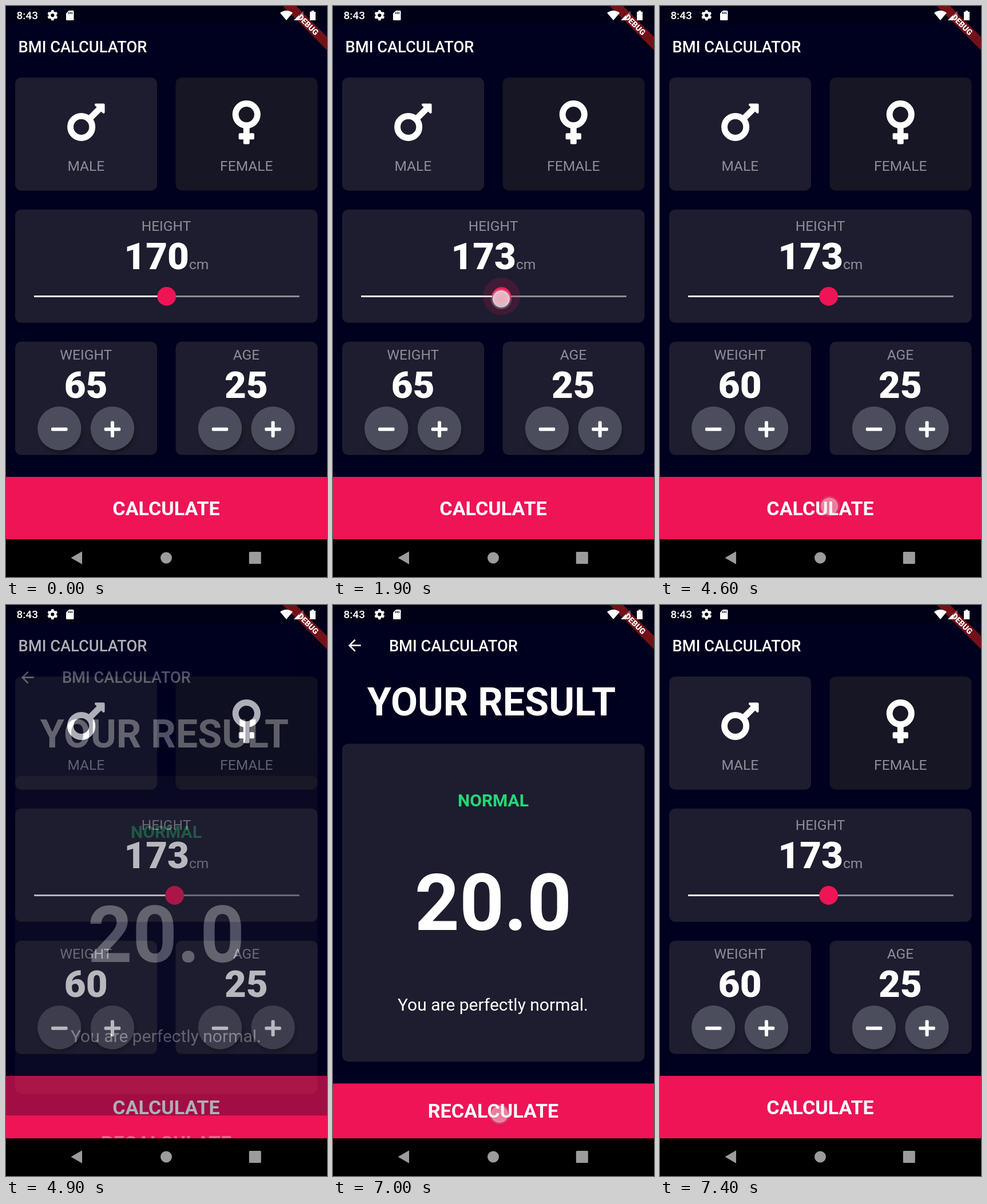
Recreate the animation shown at these times as an HTML page. Size 561x998 px, loop 9200 ms.

```html
<!DOCTYPE html>
<html lang="en">
<head>
<meta charset="utf-8">
<title>BMI calculator</title>
<style>
  html, body { margin: 0; width: 100%; height: 100%; overflow: hidden; background: #000; }
  svg { display: block; width: 100vw; height: 100vh; font-family: Roboto, "Noto Sans", sans-serif; fill: #fff; }
  .mid { text-anchor: middle; }
  .label { font-size: 24.55px; fill: #8d8e98; }
  .number { font-size: 65.45px; font-weight: 900; }
  .title { font-size: 27.3px; font-weight: 500; }
  .action { font-size: 34.1px; font-weight: 700; }
  .card { fill: #1d1d2f; }
  .pink { fill: #ee1456; }
  .page { fill: #00001f; }
</style>
</head>
<body>
<svg viewBox="0 0 561 998" preserveAspectRatio="none">
  <defs>
    <filter id="blur" x="-50%" y="-50%" width="200%" height="200%"><feGaussianBlur stdDeviation="3"/></filter>
    <radialGradient id="spot">
      <stop offset="0" stop-color="#fff" stop-opacity=".66"/>
      <stop offset=".62" stop-color="#fff" stop-opacity=".7"/>
      <stop offset=".72" stop-color="#fff" stop-opacity=".82"/>
      <stop offset=".78" stop-color="#ddd" stop-opacity=".4"/>
      <stop offset="1" stop-color="#ccc" stop-opacity="0"/>
    </radialGradient>
    <g id="minus"><rect x="-14.3" y="-3.05" width="28.6" height="6.1" rx="2"/></g>
    <g id="plus"><use href="#minus"/><use href="#minus" transform="rotate(90)"/></g>
    <g id="round">
      <circle cx="2" cy="5" r="37" fill="#000" opacity=".35" filter="url(#blur)"/>
      <circle r="38.2" fill="#4c4d5c"/>
    </g>
  </defs>

  <g id="form">
    <rect class="page" width="561" height="932"/>
    <text class="title" x="21.5" y="80.5">BMI CALCULATOR</text>

    <rect class="card" x="16" y="125" width="248" height="197.7" rx="10.5"/>
    <rect x="296.5" y="125" width="248" height="197.7" rx="10.5" fill="#161624"/>
    <g transform="translate(107.1 159.6) scale(.1705)">
      <circle cx="144" cy="304" r="112" fill="none" stroke="#fff" stroke-width="64"/>
      <path d="M235 213L335 113" stroke="#fff" stroke-width="63"/>
      <path d="M372 64h-79c-10.7 0-16 12.9-8.5 20.4L363.6 162.3c7.6 7.6 20.4 2.2 20.4-8.5V76c0-6.6-5.4-12-12-12z"/>
    </g>
    <g transform="translate(395.7 159.6) scale(.1705)">
      <circle cx="144" cy="176" r="112" fill="none" stroke="#fff" stroke-width="64"/>
      <rect x="112" y="300" width="64" height="180" rx="12"/>
      <rect x="64" y="368" width="160" height="64" rx="12"/>
    </g>
    <text class="label mid" x="139.8" y="288">MALE</text>
    <text class="label mid" x="420.3" y="288">FEMALE</text>

    <rect class="card" x="16" y="355.7" width="528.5" height="198" rx="10.5"/>
    <text class="label mid" x="280" y="393">HEIGHT</text>
    <text class="mid" x="280.3" y="460"><tspan class="number" id="height">170</tspan><tspan class="label">cm</tspan></text>
    <rect x="49" y="506.1" width="464" height="2.8" rx="1.4" fill="#8d8e98"/>
    <rect id="track" x="49" y="506.1" width="232" height="2.8" rx="1.4"/>
    <circle id="halo" class="pink" cy="507.5" opacity=".16"/>
    <circle id="thumb" class="pink" cy="507.5" r="16.4"/>

    <rect class="card" x="16" y="586.8" width="248" height="198" rx="10.5"/>
    <rect class="card" x="296.5" y="586.8" width="248" height="198" rx="10.5"/>
    <text class="label mid" x="139.8" y="618">WEIGHT</text>
    <text class="label mid" x="420" y="618">AGE</text>
    <text class="number mid" id="weight" x="139.8" y="685">65</text>
    <text class="number mid" x="420" y="685">25</text>
    <use href="#round" x="93.3" y="738.3"/>
    <circle id="press" cx="93.3" cy="738.3" r="38.2"/>
    <use href="#round" x="186" y="738.3"/>
    <use href="#round" x="374" y="738.3"/>
    <use href="#round" x="466.6" y="738.3"/>
    <use href="#minus" x="93.3" y="739.7"/>
    <use href="#plus" x="186" y="739.7"/>
    <use href="#minus" x="374" y="739.7"/>
    <use href="#plus" x="466.6" y="739.7"/>

    <rect class="pink" y="823" width="561" height="109.3"/>
    <text class="action mid" x="280" y="889.5">CALCULATE</text>
  </g>

  <g id="result">
    <rect class="page" width="561" height="932"/>
    <path transform="translate(21.3 54.3) scale(1.364)" d="M20 11H7.83l5.59-5.59L12 4l-8 8 8 8 1.41-1.41L7.83 13H20z"/>
    <text class="title" x="97.9" y="80.5">BMI CALCULATOR</text>
    <text class="mid" x="277" y="193" font-size="68.2" font-weight="700">YOUR RESULT</text>
    <rect class="card" x="16" y="242.5" width="528.5" height="555.7" rx="10.5"/>
    <text class="mid" x="280" y="351.5" font-size="30" font-weight="700" style="fill:#24d876">NORMAL</text>
    <text class="mid" x="280" y="568" font-size="136.4" font-weight="700">20.0</text>
    <text class="mid" x="279.5" y="708.5" font-size="30">You are perfectly normal.</text>
    <rect class="pink" y="836.3" width="561" height="96"/>
    <text class="action mid" x="280" y="896">RECALCULATE</text>
  </g>

  <rect width="561" height="32.5" fill="#000" opacity=".25"/>
  <g transform="translate(561 0) rotate(45)">
    <rect x="-60" y="38.2" width="120" height="16.4" fill="#000" opacity=".4" filter="url(#blur)"/>
    <rect x="-80" y="38.2" width="160" height="16.4" fill="#b71c1c" opacity=".627"/>
    <text class="mid" y="51.3" font-size="13.9" font-weight="900">DEBUG</text>
  </g>
  <text x="18.5" y="23.3" font-size="19" font-weight="500">8:43</text>
  <g transform="translate(81.3 16.3)">
    <circle r="5.1" fill="none" stroke="#fff" stroke-width="4"/>
    <g id="teeth"></g>
  </g>
  <path d="M110 8H117a1.5 1.5 0 0 1 1.5 1.5V23.500a1.5 1.5 0 0 1-1.5 1.500H106.500a1.500 1.500 0 0 1-1.500-1.500V13Z"/>
  <path d="M109.700 10.500v3.500M112.500 10.500v3.500M115.300 10.500v3.500" stroke="#00001a" stroke-width="1.300"/>
  <path d="M479 12Q490 4 501 12L490 25Z"/>
  <path d="M503 25L520 8V25Z" opacity=".3"/>
  <path d="M503 25L512 16V25Z"/>
  <path d="M531 10h3V8h4v2h3v15h-10z"/>

  <rect y="932.3" width="561" height="66" fill="#000"/>
  <g fill="#9c9c9c">
    <path d="M113.500 964.500L133 953.300V975.700Z"/>
    <circle cx="280" cy="964.500" r="10"/>
    <rect x="424.800" y="954" width="21" height="21" rx="1.500"/>
  </g>
  <g id="touch">
    <circle cy="1.500" r="16" fill="#000" opacity=".25" filter="url(#blur)"/>
    <circle r="19.500" fill="url(#spot)"/>
  </g>
</svg>
<script>
const LOOP = 9200, STEP = 100;
const el = id => document.getElementById(id);
const set = (id, attrs) => { for (const k in attrs) el(id).setAttribute(k, attrs[k]); };
const clamp = v => Math.max(0, Math.min(1, v));

el('teeth').innerHTML = [0, 60, 120].map(a =>
  `<rect x="-2.2" y="-9" width="4.4" height="4" rx=".6" transform="rotate(${a})"/>` +
  `<rect x="-2.2" y="-9" width="4.4" height="4" rx=".6" transform="rotate(${a + 180})"/>`).join('');

// Linear interpolation through [time, value] pairs, held at both ends.
function along(keys, t) {
  if (t <= keys[0][0]) return keys[0][1];
  for (let i = 1; i < keys.length; i++) {
    const [t0, a] = keys[i - 1], [t1, b] = keys[i];
    if (t <= t1) return a + (b - a) * (t - t0) / (t1 - t0);
  }
  return keys[keys.length - 1][1];
}

function bezier(x1, y1, x2, y2) {
  const at = (a, b, s) => 3 * a * s * (1 - s) ** 2 + 3 * b * s * s * (1 - s) + s ** 3;
  return p => {
    let lo = 0, hi = 1;
    for (let i = 0; i < 24; i++) {
      const m = (lo + hi) / 2;
      if (at(x1, x2, m) < p) lo = m; else hi = m;
    }
    return at(y1, y2, lo);
  };
}
const slide = bezier(.4, 0, .2, 1), fade = bezier(.42, 0, 1, 1);

const heightKeys = [[200, 170], [500, 165], [900, 173], [1000, 174], [1200, 174],
  [1300, 173], [1500, 173], [1600, 174], [1700, 173]];
const haloKeys = [[0, 0], [100, .5], [200, 1], [2000, 1], [2100, .5], [2200, 0]];
const pressKeys = [[2400, 0], [2500, .12], [2600, .2], [2700, .25], [3300, .25], [3400, .2], [3600, 0]];

function touchAt(t, thumbX) {
  if (t >= 100 && t < 2200) return [thumbX - .7, 512, along([[1900, 1], [2000, .6], [2200, 0]], t)];
  if (t >= 2500 && t < 3600) {
    const down = t < 3400 && t / STEP % 2 === 1;
    return [126, 746, down ? 1 : t < 3500 ? .6 : .25];
  }
  if (t >= 4600 && t < 4900) return [296, 874.5, along([[4600, .65], [4700, .65], [4900, 0]], t)];
  if (t >= 7000 && t < 7300) return [291, 890, along([[7000, .65], [7100, .6], [7300, 0]], t)];
  return [0, 0, 0];
}

function draw(time) {
  const t = Math.floor(time % LOOP / STEP) * STEP;

  const height = Math.round(along(heightKeys, t));
  const x = 49 + (height - 120) * 4.635;
  el('height').textContent = height;
  set('track', { width: x - 49 });
  set('thumb', { cx: x });
  set('halo', { cx: x, r: 32.7 * along(haloKeys, t) });

  const taps = Math.max(0, Math.min(5, Math.floor((t - 2400) / 200)));
  el('weight').textContent = 65 - taps;
  set('press', { opacity: along(pressKeys, t) });

  const p = t < 6000 ? clamp((t - 4750) / 300) : 1 - clamp((t - 7050) / 300);
  set('result', {
    opacity: fade(p),
    transform: `translate(0 ${p === 1 ? 0 : 249.5 * (1 - slide(p))})`,
    visibility: p > 0 ? 'visible' : 'hidden'
  });

  const [tx, ty, alpha] = touchAt(t, x);
  set('touch', { transform: `translate(${tx} ${ty})`, opacity: alpha });
}

const start = performance.now();
function tick() {
  draw(performance.now() - start);
  requestAnimationFrame(tick);
}
draw(0);
requestAnimationFrame(tick);
</script>
</body>
</html>
```
